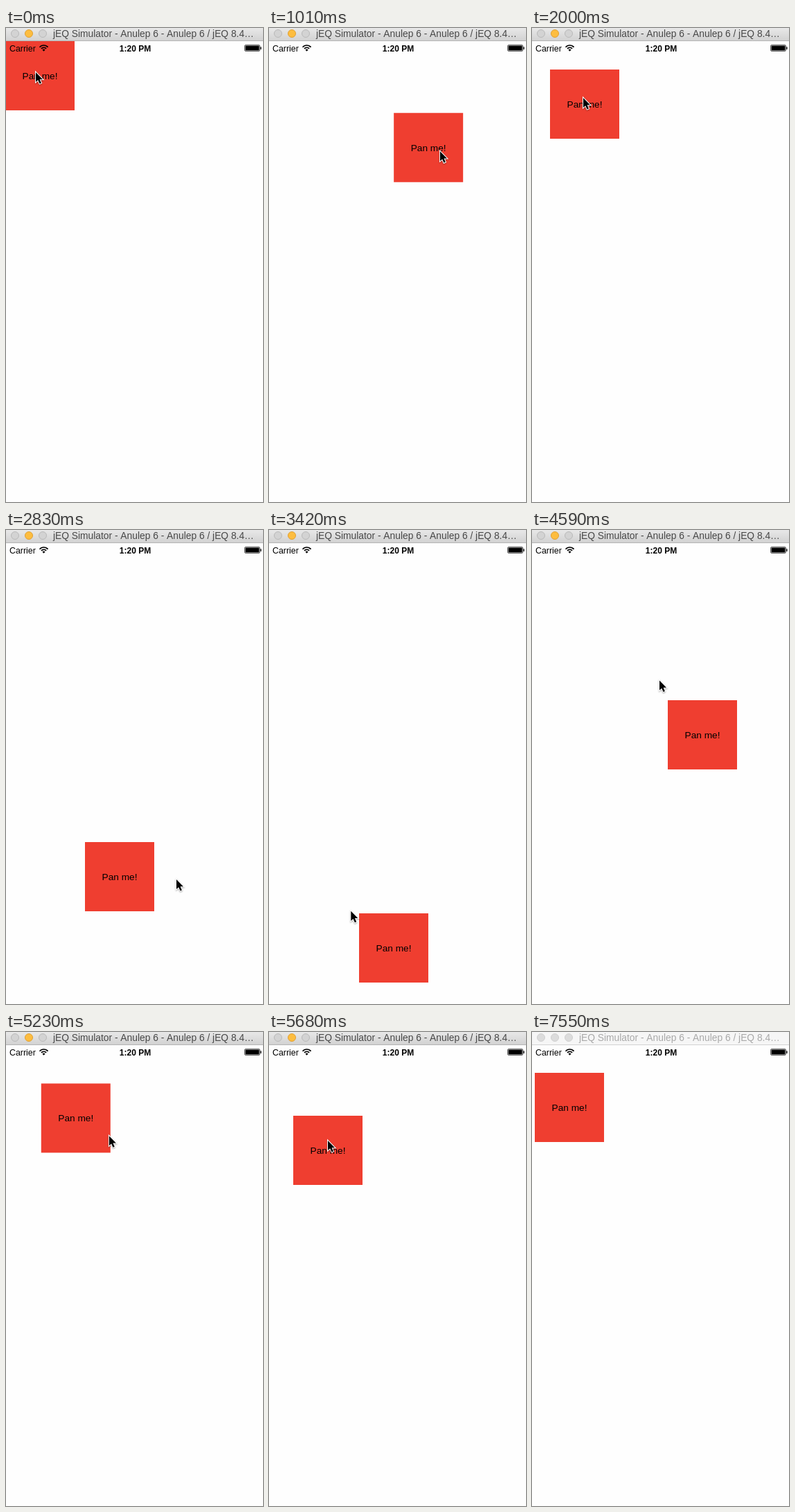
These frames come from a looping animation (371x685 px, 7.65 s). An HTML page with a canvas:

```html
<!DOCTYPE html>
<html lang="en">
<head>
<meta charset="utf-8">
<title>Pan me!</title>
<style>
html, body { margin: 0; width: 100%; height: 100%; overflow: hidden; background: #fefefe; }
canvas { display: block; }
</style>
</head>
<body>
<canvas id="stage" width="371" height="685"></canvas>
<script>
const ctx = document.getElementById('stage').getContext('2d');
const W = 371, H = 685, LOOP = 7650;
const FONT = '"Liberation Sans", Arial, sans-serif';

// Each drag: start time, step length, grab point (from, to), keys [step, x, y] of the square.
const drags = [
  { at: 470, step: 58.1, grab: [44, 45, 48, 41],
    keys: [[0, -1, 19], [13, 233, 153], [23, 26, 60]] },
  { at: 2000, step: 58.1, grab: [48, 41, 48, 43],
    keys: [[0, 26, 60], [1, 26, 60], [4, 36, 270], [7, 26, 442]] },
  { at: 2650, step: 58.1, grab: [48, 43, 48, 43],
    keys: [[0, 26, 442], [3, 114, 451], [4, 198, 462], [7, 244, 462]] },
  { at: 3240, step: 58.1, grab: [48, 43, 48, 60],
    keys: [[0, 244, 462], [3, 130, 554], [5, 32, 420], [7, 110, 245], [8.5, 205, 310],
      [10, 177, 410], [11, 130, 410], [12, 105, 357], [14, 110, 260], [16, 170, 235],
      [18, 225, 290], [20, 230, 330], [21.5, 222, 305], [23, 196, 246], [24, 136, 160],
      [27, 26, 68]] },
  { at: 5170, step: 56.4, grab: [48, 60, 48, 60],
    keys: [[0, 26, 68], [3, 140, 110], [5, 170, 180], [6, 145, 196], [9, 35, 121],
      [10, 37, 97], [13, 26, 69], [15, 4, 59]], leave: [15, 25] }
];

const clamp = (v, lo, hi) => Math.min(hi, Math.max(lo, v));

// Slope of a monotone curve through the keys, zero at ends and turning points.
function slope(keys, i, axis) {
  const a = keys[i - 1], b = keys[i], c = keys[i + 1];
  if (!a || !c) return 0;
  const s = (b[axis] - a[axis]) / (b[0] - a[0]);
  const u = (c[axis] - b[axis]) / (c[0] - b[0]);
  return s * u <= 0 ? 0 : 2 * s * u / (s + u);
}

function sample(keys, k, axis) {
  const last = keys[keys.length - 1];
  if (k <= 0) return keys[0][axis];
  if (k >= last[0]) return last[axis];
  const i = keys.findIndex(p => p[0] > k) - 1;
  const a = keys[i], b = keys[i + 1], d = b[0] - a[0];
  const u = (k - a[0]) / d, v = 1 - u;
  return a[axis] * v * v * (1 + 2 * u) + b[axis] * u * u * (3 - 2 * u) +
    d * u * v * (v * slope(keys, i, axis) - u * slope(keys, i + 1, axis));
}

function pose(t) {
  const started = drags.filter(d => d.at <= t);
  if (!started.length) return { x: -1, y: 19, cx: 43, cy: 64 };
  const { at, step, grab, keys, leave } = started[started.length - 1];
  const k = Math.floor((t - at) / step + 0.001);
  const end = keys[keys.length - 1][0];
  const g = clamp(k / end, 0, 1);
  const mix = (a, b) => a + (b - a) * g;
  const p = {
    x: sample(keys, k, 1),
    y: sample(keys, k, 2),
    // the square trails the pointer by one step
    cx: sample(keys, k + 1, 1) + mix(grab[0], grab[2]),
    cy: sample(keys, k + 1, 2) + mix(grab[1], grab[3])
  };
  if (leave) {
    const u = clamp((k - leave[0]) / (leave[1] - leave[0]), 0, 1);
    const e = u * u * (3 - 2 * u);
    p.cx += 335 * e;
    p.cy += 502 * e;
  }
  return p;
}

function text(str, x, y, font, color, align = 'left') {
  ctx.font = font + ' ' + FONT;
  ctx.fillStyle = color;
  ctx.textAlign = align;
  ctx.fillText(str, x, y);
}

function disc(x, y, r, fill, line) {
  ctx.beginPath();
  ctx.arc(x, y, r, 0, Math.PI * 2);
  ctx.fillStyle = fill;
  ctx.fill();
  ctx.strokeStyle = line;
  ctx.lineWidth = 1;
  ctx.stroke();
}

function titleBar(active) {
  const fade = ctx.createLinearGradient(0, 0, 0, 18);
  fade.addColorStop(0, active ? '#e8e8e8' : '#f6f6f6');
  fade.addColorStop(1, active ? '#d2d2d2' : '#f6f6f6');
  ctx.fillStyle = fade;
  ctx.fillRect(0, 0, W, 18);
  ctx.fillStyle = active ? '#b4b4b4' : '#d2d2d2';
  ctx.fillRect(0, 18, W, 1);
  for (let i = 0; i < 3; i++) {
    const lit = active && i === 1;
    disc(13 + 20 * i, 8, 5.5, lit ? '#fdbd3f' : active ? '#d3d3d3' : '#dcdcdc',
      lit ? '#e0a034' : active ? '#b9b9b9' : '#d0d0d0');
  }
  text('jEQ Simulator - Anulep 6 - Anulep 6 / jEQ 8.4…', 68, 13, '13.8px',
    active ? '#484848' : '#a9a9a9');
}

function statusBar() {
  text('Carrier', 5, 34, '12.4px', '#000');
  text('1:20 PM', 186.5, 34, 'bold 12px', '#000', 'center');

  ctx.strokeStyle = '#000';
  ctx.lineWidth = 1.7;
  for (const r of [4.7, 8]) {
    ctx.beginPath();
    ctx.arc(54.5, 33, r, -Math.PI * 0.77, -Math.PI * 0.23);
    ctx.stroke();
  }
  ctx.fillStyle = '#000';
  ctx.beginPath();
  ctx.moveTo(54.5, 33.8);
  ctx.arc(54.5, 33.3, 2.7, -Math.PI * 0.77, -Math.PI * 0.23);
  ctx.fill();

  ctx.lineWidth = 0.8;
  ctx.strokeStyle = '#333';
  ctx.beginPath();
  ctx.roundRect(344.5, 24.5, 22, 9, 1.6);
  ctx.stroke();
  ctx.fillRect(345.5, 25.5, 20, 7);
  ctx.fillRect(367.3, 27.3, 1.3, 3.6);
}

function pointer(x, y) {
  const pts = [[0, 0], [0, 14], [3.2, 11.2], [5.6, 16.5], [7.9, 15.5], [5.6, 10.2], [10, 10.2]];
  ctx.save();
  ctx.translate(x, y);
  ctx.beginPath();
  pts.forEach(p => ctx.lineTo(...p));
  ctx.closePath();
  ctx.shadowColor = 'rgba(0,0,0,.35)';
  ctx.shadowBlur = 2;
  ctx.shadowOffsetY = 1;
  ctx.strokeStyle = '#fff';
  ctx.lineWidth = 2;
  ctx.stroke();
  ctx.shadowColor = 'transparent';
  ctx.fillStyle = '#000';
  ctx.fill();
  ctx.restore();
}

function draw(now) {
  const t = now % LOOP;
  const p = pose(t);
  ctx.fillStyle = '#fefefe';
  ctx.fillRect(0, 0, W, H);
  ctx.fillStyle = '#ef3e30';
  ctx.fillRect(p.x, p.y, 100, 100);
  text('Pan me!', p.x + 50, p.y + 55, '13.7px', '#000', 'center');
  statusBar();
  titleBar(t < 7550);
  if (p.cx < W) pointer(p.cx, p.cy);
}

const start = performance.now();
function frame() {
  draw(performance.now() - start);
  requestAnimationFrame(frame);
}
frame();
</script>
</body>
</html>
```
